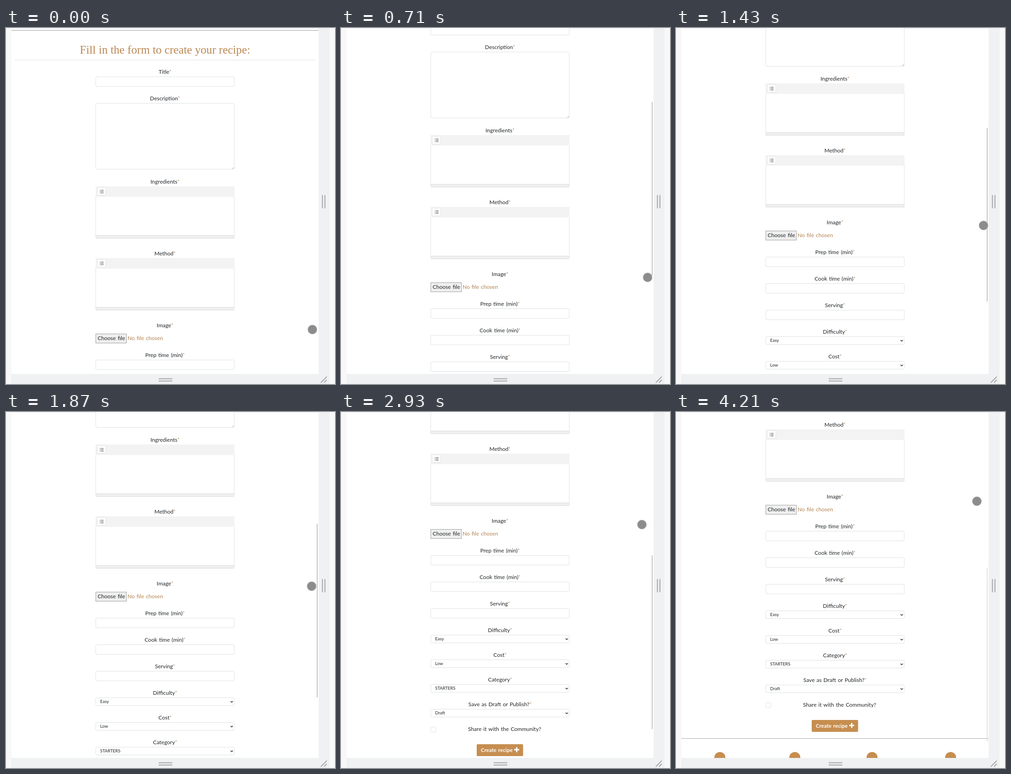
Animation, 720 px wide and 778 px high, one loop 4580 ms. Source, as an HTML page:

```html
<!DOCTYPE html>
<html lang="en">
<head>
<meta charset="utf-8">
<title>Recipe form</title>
<style>
  html, body { margin: 0; width: 100%; height: 100%; overflow: hidden; background: #f8f8f8; }
  svg { display: block; width: 720px; height: 778px; }
  text { font: 12px Lato, "Open Sans", sans-serif; word-spacing: 1px; fill: #212529; }
  .label { text-anchor: middle; }
  .star { fill: #bd8a5c; font-size: 11px; }
  .head { font: 25.2px "Liberation Serif", "Noto Serif", serif; word-spacing: 0; fill: #bb8854; text-anchor: middle; }
  .opt { font-size: 9.5px; }
  .hint { fill: #b88c5c; font-weight: 500; }
  .send { font-size: 11.6px; font-weight: 700; fill: #fff; }
  .box { fill: #fff; stroke: #dfe1e3; }
  .grip { stroke: #a4a6a8; stroke-width: 2; fill: none; }
</style>
</head>
<body>
<svg viewBox="0 0 720 778">
  <defs><clipPath id="view"><rect x="12" width="673" height="756"/></clipPath></defs>
  <rect width="720" height="778" fill="#f8f8f8"/>
  <path d="M684 0H708V778H12V756H684Z" fill="#eff1f3"/>
  <rect x="12" width="672" height="756" fill="#fff"/>
  <rect x="12" width="672" height="1" fill="#ededed"/>
  <g clip-path="url(#view)">
    <g id="page"></g>
    <rect id="bar" x="680" width="2" height="380" rx="1"/>
  </g>
  <path class="grip" d="M692.5 365V394M698 365V394M334 766.5H364M334 771.5H364M689 775L702 762M696 775L702 769"/>
  <circle id="dot" r="10" fill="#8c8c8c" stroke="#bdbdbd"/>
</svg>
<script>
const LOOP = 4580;
const $ = id => document.getElementById(id);
const page = $('page');

function add(tag, attrs, text) {
  const el = document.createElementNS('http://www.w3.org/2000/svg', tag);
  for (const key in attrs) el.setAttribute(key, attrs[key]);
  if (text) el.textContent = text;
  page.appendChild(el);
  return el;
}

const write = (cls, x, y, text) => add('text', { class: cls, x, y }, text);
const line = (d, stroke, width = 1) => add('path', { d, stroke, 'stroke-width': width, fill: 'none' });
const fill = (x, y, width, height, color) => add('rect', { x, y, width, height, fill: color });
const box = (x, y, w, h, rx = 2.5) =>
  add('rect', { class: 'box', x: x + .5, y: y + .5, width: w - 1, height: h - 1, rx });

function label(y, text) {
  const el = write('label', 348, y, text);
  const star = document.createElementNS(el.namespaceURI, 'tspan');
  star.setAttribute('class', 'star');
  star.textContent = '*';
  el.appendChild(star);
}

function field(y, text, h = 22) {
  label(y - 6, text);
  box(196, y, 304, h);
}

function editor(y, text) {
  label(y - 6, text);
  box(196, y, 304, 114, 1.5);
  fill(196, y, 304, 23, '#f3f3f3');
  fill(197, y + 108, 302, 5, '#f0f0f0');
  line(`M197 ${y + 107.5}H499M197 ${y + 113.5}H499`, '#dadada');
  box(199, y + 2, 20, 18, 2);
  for (const dy of [8.5, 11.5, 14.5])
    line(`M205 ${y + dy}H206.5M207.5 ${y + dy}H213.5`, '#444', 1.2);
}

function select(y, text, option) {
  label(y - 6, text);
  box(196, y, 304, 18);
  write('opt', 206, y + 12, option);
  line(`M491.5 ${y + 8}L494 ${y + 10.5}L496.5 ${y + 8}`, '#333', 1.5);
}

function build() {
  fill(12, 4.5, 672, 1.5, '#b4b8b7');
  write('head', 348, 56, 'Fill in the form to create your recipe:');
  line('M19 70H677', '#dedede');

  field(106, 'Title');
  field(164, 'Description', 145);
  line('M496 307.5L498.5 305', '#777');
  editor(346, 'Ingredients');
  editor(503, 'Method');

  label(654, 'Image');
  add('rect', { x: 196.5, y: 668.5, width: 67, height: 20, fill: '#efefef', stroke: '#a0a0a0' });
  write('', 200.5, 682, 'Choose file');
  write('hint', 266, 682, 'No file chosen');

  field(725, 'Prep time (min)');
  field(783, 'Cook time (min)');
  field(841, 'Serving');
  select(899, 'Difficulty', 'Easy');
  select(953, 'Cost', 'Low');
  select(1007, 'Category', 'STARTERS');
  select(1061, 'Save as Draft or Publish?', 'Draft');

  box(196, 1100, 12, 12, 2);
  write('', 278, 1109, 'Share it with the Community?');

  add('rect', { x: 297, y: 1138, width: 101.5, height: 26, rx: 2, fill: '#c68e50' });
  write('send', 306, 1155, 'Create recipe');
  line('M379 1150H390M384.5 1144.5V1155.5', '#fff', 2.8);

  line('M12 1178.5H684', '#a9a9a9');
  for (const x of [96, 260, 429, 601])
    add('circle', { cx: x, cy: 1220, r: 12, fill: '#c68e50' });
}

// Moments at which the picture is refreshed
const ticks = [
  0, 100, 180, 260, 340, 420, 500, 570,
  630, 710, 810, 890, 970, 1050, 1130,
  1190, 1270, 1350, 1430, 1530, 1610,
  1720, 1790, 1870, 1940, 2020, 2090,
  2450, 2490, 2540, 2590, 2640, 2690, 2740, 2780, 2830, 2880, 2930,
  3010, 3090, 3160, 3240, 3310, 3390, 3460, 4210
];

// [time, scroll, pointer x, pointer y]
const drag = [
  [0, 0, 670.5, 659],
  [100, 5, 670.5, 653],
  [710, 112, 671, 545],
  [1130, 180, 676, 476],
  [1430, 225, 673, 431.5],
  [1610, 245, 671, 411],
  [2090, 300, 667, 355],
  [2450, 308, 663, 347],
  [2930, 412, 658.5, 246],
  [3460, 465, 658.5, 195],
  [LOOP, 465, 658.5, 195]
];

function pose(t) {
  const i = drag.findIndex(k => k[0] > t);
  const a = drag[i - 1], b = drag[i];
  const p = (t - a[0]) / (b[0] - a[0]);
  return a.map((v, n) => v + (b[n] - v) * p);
}

function draw(now) {
  const time = now % LOOP;
  const t = ticks.filter(k => k <= time).pop();
  const [, y, px, py] = pose(t);
  const scroll = Math.round(y);
  page.setAttribute('transform', `translate(0 ${-scroll})`);
  $('bar').setAttribute('y', Math.round(104.4 + .506 * scroll));
  $('bar').setAttribute('fill', t < 100 ? 'none' : t < 4210 ? '#c3c3c3' : '#e4e4e4');
  $('dot').setAttribute('cx', px);
  $('dot').setAttribute('cy', py);
}

build();
const start = performance.now();
function loop() {
  draw(performance.now() - start);
  requestAnimationFrame(loop);
}
loop();
</script>
</body>
</html>
```
